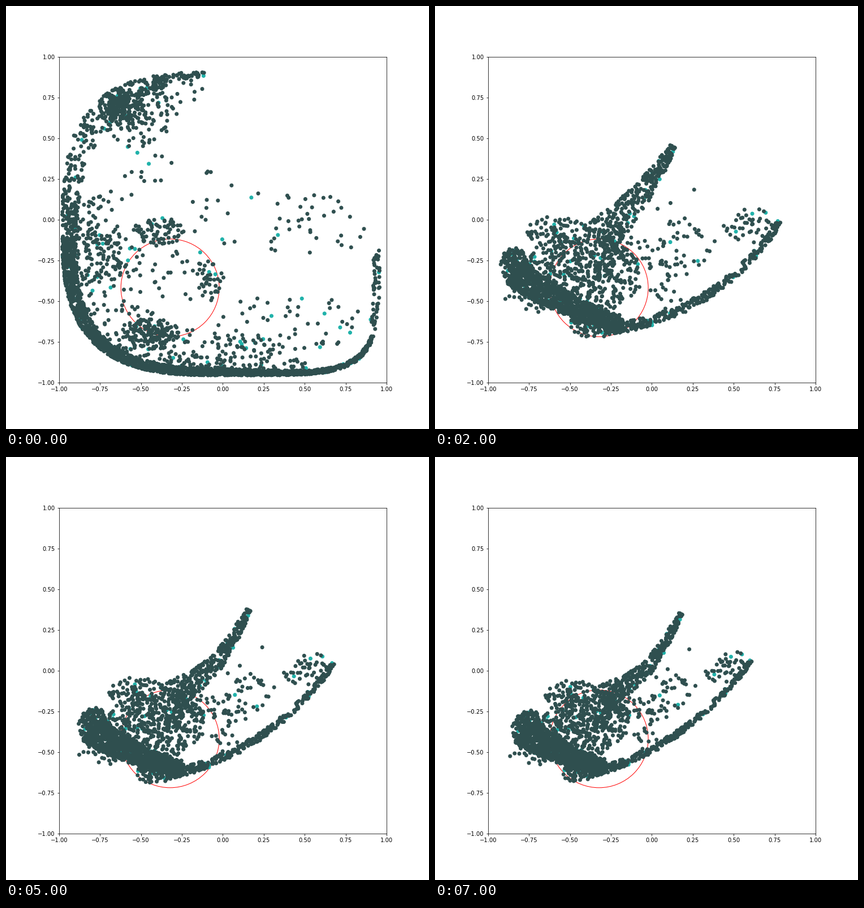
A matplotlib script that plays this animation: 748 by 748 pixels, repeating every 8 s.

```python
import numpy as np
import matplotlib.pyplot as plt
from matplotlib.animation import FuncAnimation

SIZE, DPI = 748, 72
CX, CY, RX, RY = 380, 385, 281, 268  # rounded outline of the wide cloud
WIDE_STEPS, STEPS = 2, 8
rng = np.random.default_rng(7)


def corner(u):
    """Superellipse exponent: the right side has tighter corners."""
    return np.where(u > 0, 5.5, 3.0)


def radius(u, v):
    p = corner(u)
    return (np.abs(u) ** p + np.abs(v) ** p) ** (1 / p)


def rim(n, start, end, depth0, depth1, power=1):
    """Dots along the outline (clockwise from the right), reaching inwards."""
    k = rng.random(n)
    phi = np.radians(start + (end - start) * k)
    u, v = np.cos(phi), np.sin(phi)
    depth = (depth0 + (depth1 - depth0) * k) * rng.random(n) ** power
    r = (1 - depth) / radius(u, v)
    return np.column_stack([CX + RX * r * u, CY + RY * r * v])


def blob(n, x, y, rx, ry):
    r, a = rng.random(n) ** 0.65, rng.random(n) * 2 * np.pi
    return np.column_stack([x + rx * r * np.cos(a), y + ry * r * np.sin(a)])


def brush(n, start, bend, end, w0, w1):
    """Dots along a quadratic curve whose half width runs from w0 to w1."""
    a, b, c = np.array([start, bend, end], float)
    t = rng.random((n, 1)) ** 1.2
    path = (1 - t) ** 2 * a + 2 * t * (1 - t) * b + t ** 2 * c
    slope = (1 - t) * (b - a) + t * (c - b)
    normal = slope[:, ::-1] * [-1, 1] / np.hypot(*slope.T)[:, None]
    return path + normal * (w0 + (w1 - w0) * t) * rng.uniform(-1, 1, (n, 1))


def cloud(*parts):
    """Dots in drawing order: the few teal ones lie under the dark ones."""
    pts = rng.permutation(np.vstack(parts))
    teal = len(pts) // 22
    return pts, ["lightseagreen"] * teal + ["darkslategray"] * (len(pts) - teal)


def move_wide(pts, t):
    """Shear towards the lower middle, kept inside the outline."""
    u, v = (pts[:, 0] - CX) / RX, (pts[:, 1] - CY) / RY
    swell = np.sqrt(np.clip(1 - u ** 2, 0, 1))
    u, v = (u - t * 24 * v * swell / RX,
            v + t * 33 * (0.42 - v) * (1 - v ** 2) * swell / RY)
    fit = np.maximum(radius(u, v), 1)
    return np.column_stack([CX + RX * u / fit, CY + RY * v / fit])


def move_folded(pts, t):
    """Contract: steady sideways, easing out downwards."""
    x, y = pts.T
    dx = 0.2 * np.minimum(310 - x, 130) - 0.2 * (y - 430)
    bump = np.exp(-((x - 365) ** 2 + (y - 320) ** 2) / (2 * 70 ** 2))
    dy = 0.1 * (340 - x) - 0.12 * (y - 430) + 35 * bump
    ease = (1 - (1 - t / 6) ** 2) / (1 - (1 / 6) ** 2)
    return np.column_stack([x + dx * t / 5, y + dy * ease])


def to_data(pts):
    """Stage pixels to axis units."""
    x, y = pts.T / SIZE
    return np.column_stack([(x - 0.125) / 0.775 * 2 - 1,
                            1 - (y - 0.12) / 0.77 * 2])


wide, wide_colors = cloud(
    rim(1500, 38, 172, 0.015, 0.085),
    rim(650, 60, 175, 0.25, 0.38, 2.5),
    rim(55, 10, 38, 0.04, 0.04),
    rim(170, 170, 220, 0.08, 0.15),
    rim(140, 220, 250, 0.15, 0.08),
    rim(45, 245, 264, 0.06, 0.03),
    blob(110, 202, 172, 40, 28),       # upper left knot and its spray
    blob(80, 208, 190, 40, 32),
    blob(80, 240, 188, 72, 62),
    blob(20, 305, 155, 48, 38),
    blob(110, 160, 415, 55, 80),       # left interior
    blob(40, 120, 385, 15, 38),
    blob(70, 270, 398, 46, 24),        # knots around the ring
    blob(40, 358, 485, 28, 38),
    blob(150, 258, 580, 48, 28),
    blob(45, 265, 480, 75, 70),
    blob(18, 230, 295, 70, 50),        # loose dots
    blob(18, 390, 370, 70, 90),
    blob(38, 540, 390, 95, 65),
    blob(60, 500, 565, 140, 55),
)
folded, folded_colors = cloud(
    brush(850, (140, 470), (220, 530), (330, 565), 26, 14),
    brush(330, (300, 572), (494, 554), (612, 380), 10, 5),
    brush(320, (285, 415), (365, 346), (420, 248), 34, 6),
    blob(150, 140, 458, 25, 30),
    blob(550, 255, 475, 112, 72),
    blob(150, 285, 560, 48, 27),
    blob(35, 170, 518, 48, 25),
    blob(75, 215, 398, 55, 27),
    blob(60, 325, 430, 52, 42),
    blob(40, 410, 480, 38, 65),
    blob(30, 440, 420, 55, 45),
    blob(45, 560, 390, 52, 32),
    blob(3, 430, 320, 60, 50),
)

fig, ax = plt.subplots(figsize=(SIZE / DPI, SIZE / DPI), dpi=DPI)
fig.subplots_adjust(left=0.1252)
ax.set_xlim(-1, 1)
ax.set_ylim(-1, 1)
ax.add_patch(plt.Circle((-0.322, -0.419), 0.3, color="red", fill=False))
dots = ax.scatter(*to_data(wide).T, c=wide_colors)


def draw(i):
    if i < WIDE_STEPS:
        pts, colors = move_wide(wide, i), wide_colors
    else:
        pts, colors = move_folded(folded, i - WIDE_STEPS), folded_colors
    dots.set_offsets(to_data(pts))
    dots.set_color(colors)
    return [dots]


anim = FuncAnimation(fig, draw, frames=STEPS, interval=1000, repeat=True,
                     repeat_delay=0)
plt.show()
```
